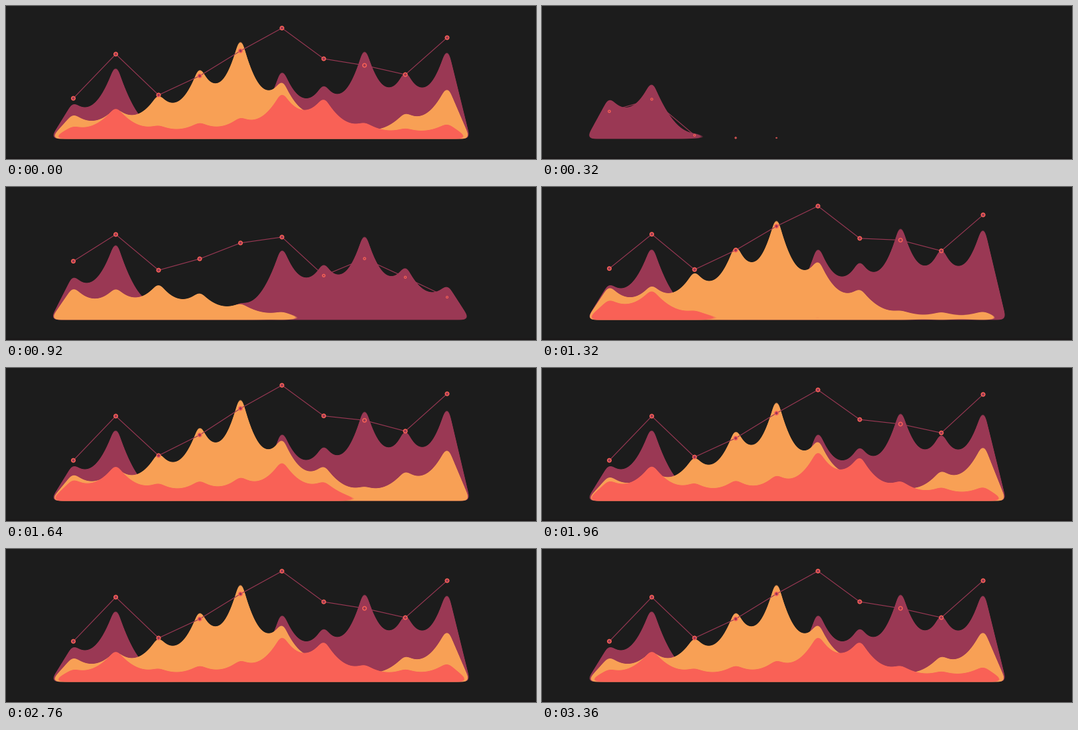
Write a matplotlib script that moves like this. It is 799 by 232 pixels and loops after 4360 ms.

```python
import numpy as np
import matplotlib.pyplot as plt
from matplotlib.animation import FuncAnimation
from matplotlib.collections import LineCollection
from matplotlib.colors import to_rgb
from matplotlib.patches import Circle, Rectangle

W, H, DPI = 799, 232, 64
STEP, FRAMES, END = 40, 109, 3360
PX = 72 / DPI                       # one pixel in points
MAROON, ORANGE, RED = "#9a3854", "#f8a055", "#f96156"

XS = np.array([101.5, 165.5, 230, 292, 353.5, 416, 479, 540.5, 602, 665])
LEFT, RIGHT, BASE = 66.5, 700, 201.5
IDX = np.arange(10)
STAGGER = 85

# colour, start, settle time, heights
AREAS = [
    (MAROON, 18, 1040, [57, 117, 20, 15, 20, 110, 86, 144, 107, 143]),
    (ORANGE, 528, 1573, [39, 48, 70, 113, 160, 92, 49, 16, 41, 82]),
    (RED, 980, 2072, [20, 50, 21.5, 26, 34, 73, 65, 26, 17, 24]),
]
AREA_EXTRA = np.array([14.0] + [7.0] * 9)

LINE_BASE = 200
LINE = np.array([60, 127, 65, 94, 132, 166.5, 120, 110, 96, 152])
LINE_EXTRA = np.array([29, 2, 11, 13, 13, 11.5, 10, 11, 8.5, 9.5])
LINE_PACE = np.array([336, 246, 310, 430, 414, 402, 408, 245, 216, 218])

# working window of the blurred areas
X0, X1, Y0, Y1 = 50, 720, 30, 216
SIGMA, GAIN = 5, 16


def blur_matrix(n):
    d = np.subtract.outer(np.arange(n), np.arange(n))
    k = np.exp(-d ** 2 / (2 * SIGMA ** 2))
    return (k / (SIGMA * np.sqrt(2 * np.pi))).astype(np.float32)


BLUR_X, BLUR_Y = blur_matrix(X1 - X0), blur_matrix(Y1 - Y0)
COLS = np.arange(X0, X1) + 0.5
ROWS = np.arange(Y0, Y1)[:, None]


def smooth(u):
    u = np.clip(u, 0, 1)
    return u * u * (3 - 2 * u)


def rise(age, pace):
    r = (np.maximum(age, 0) / pace) ** 4
    return r / (1 + r)


def extra_left(t, settle, half):
    """Share of the overshoot that is still there at each point."""
    return 1 - smooth((t - settle - STAGGER * IDX + half) / (2 * half))


def area_heights(t, start, settle, final):
    final = np.array(final)
    if t >= END:
        return final
    age = t - start - STAGGER * IDX
    peak = final + AREA_EXTRA * extra_left(t, settle, 200)
    foot = 0.15 * smooth((age + 220) / 240)
    return peak * (foot + (1 - foot) * rise(age, 180))


def profile(h):
    """Height of each column: sagging curves between peaks, straight ends."""
    i = np.clip(np.searchsorted(XS, COLS) - 1, 0, 8)
    u = (COLS - XS[i]) / (XS[i + 1] - XS[i])
    a, b = h[i], h[i + 1]
    sag = 0.26 * np.sqrt(a * b)
    y = a * (1 - u) ** 2 + 2 * sag * u * (1 - u) + b * u ** 2
    y = np.where(COLS < XS[0], h[0] * (COLS - LEFT) / (XS[0] - LEFT), y)
    y = np.where(COLS > XS[-1], h[-1] * (RIGHT - COLS) / (RIGHT - XS[-1]), y)
    return np.maximum(y, 0)


def goo_alpha(h):
    top = BASE - profile(h)
    cover = np.clip(np.minimum(ROWS + 1, BASE) - np.maximum(ROWS, top), 0, 1)
    soft = BLUR_Y @ cover.astype(np.float32) @ BLUR_X
    return np.clip((soft - 0.5) * GAIN + 0.5, 0, 1)


def line_state(t):
    if t >= END:
        return LINE_BASE - LINE, np.full(10, 3.5)
    age = t - STAGGER * IDX
    peak = LINE + LINE_EXTRA * extra_left(t, 1350, 300)
    radius = np.interp(age, [-90, -20, 150, 400, 490], [0, 1.2, 2, 2.5, 3.5])
    return LINE_BASE - peak * rise(age, LINE_PACE), radius


fig = plt.figure(figsize=(W / DPI, H / DPI), dpi=DPI, facecolor="#1c1c1c")
ax = fig.add_axes([0, 0, 1, 1])
ax.set_axis_off()
ax.add_patch(Rectangle((0, 230), W, 2, color="#191617", lw=0))

layers = []
for z, (color, *_) in enumerate(AREAS):
    pic = np.zeros((Y1 - Y0, X1 - X0, 4), np.float32)
    pic[..., :3] = to_rgb(color)
    im = ax.imshow(pic, extent=(X0, X1, Y1, Y0), interpolation="nearest",
                   aspect="auto", zorder=2 + z)
    layers.append((im, pic))

line = LineCollection([], linewidths=1.15 * PX, zorder=6)
ax.add_collection(line)
dots = [ax.add_patch(Circle((x, LINE_BASE), 1, fc=MAROON, ec=RED, zorder=7))
        for x in XS]
ax.set_xlim(0, W)
ax.set_ylim(H, 0)


def update(frame):
    t = END if frame == 0 else min(frame * STEP, END)
    for (im, pic), (_, start, settle, final) in zip(layers, AREAS):
        pic[..., 3] = goo_alpha(area_heights(t, start, settle, final))
        im.set_data(pic)

    ys, radius = line_state(t)
    pts = np.column_stack([XS, ys])
    line.set_segments([pts[i:i + 2] for i in range(9)])
    shade = smooth((radius[1:] - 1.6) / 0.4)
    line.set_color([(*to_rgb(MAROON), s) for s in shade])
    for dot, x, y, r in zip(dots, XS, ys, radius):
        width = min(1.5, 0.55 * r)
        dot.center = (x, y)
        dot.set_radius(max(r - width / 2, 0))
        dot.set_linewidth(width * PX)
        dot.set_visible(r > 0.05)
    return [im for im, _ in layers] + [line] + dots


anim = FuncAnimation(fig, update, frames=FRAMES, interval=STEP,
                     init_func=lambda: update(0), repeat=True, repeat_delay=0)
plt.show()
```
